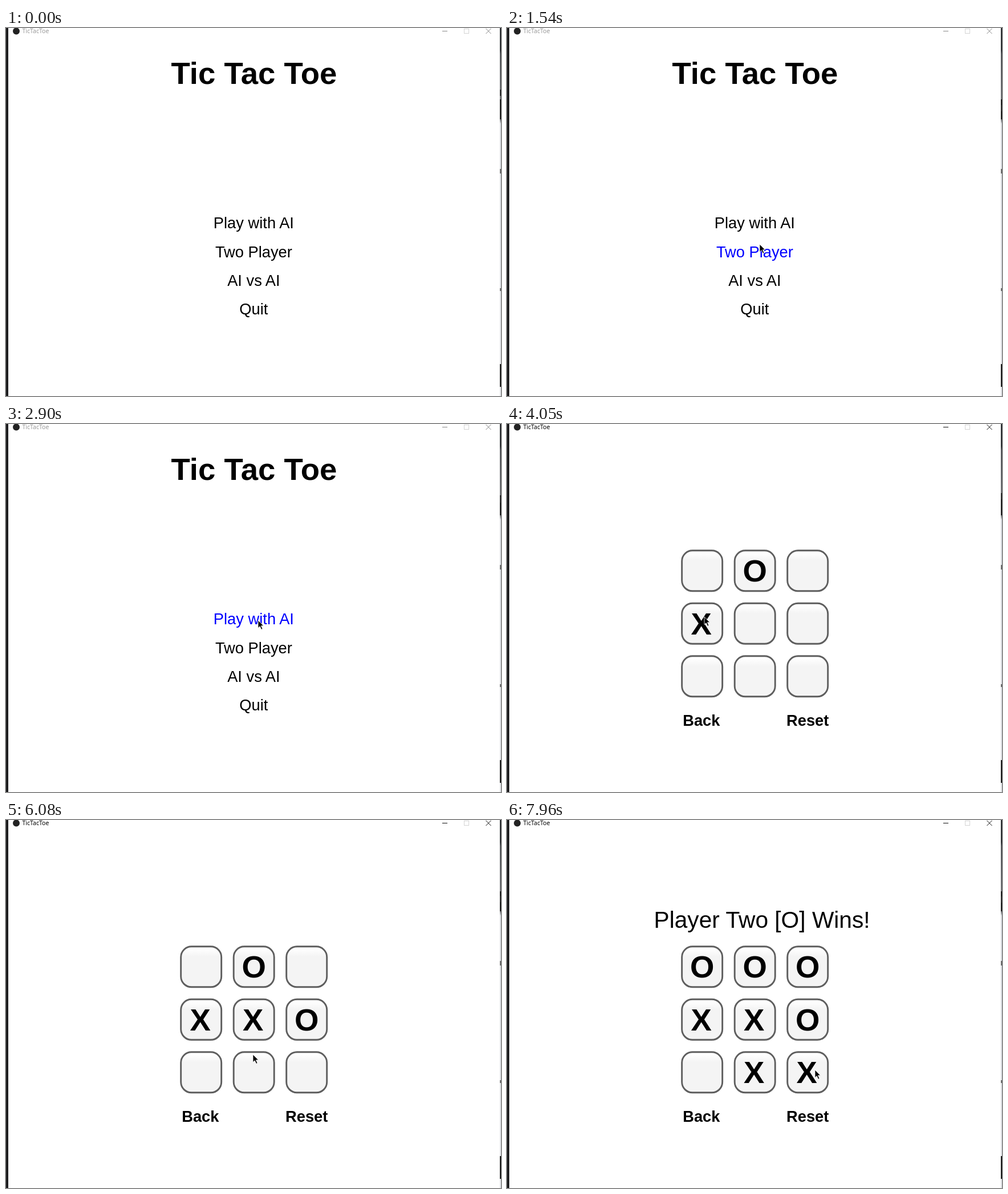
An HTML page that plays this animation: 868x645 px, repeating every 8000 ms.

```html
<!DOCTYPE html>
<html lang="en">
<head>
<meta charset="utf-8">
<title>TicTacToe</title>
<style>
  html, body { margin: 0; width: 100%; height: 100%; overflow: hidden; background: #fff; }
  svg { display: block; width: 868px; height: 645px; }
  text { font: 27.3px "Liberation Sans", Arial, sans-serif; }
  .bold { font-weight: bold; }
  .huge { font-size: 54.5px; }
  .result { font-size: 40.7px; }
  .caption { font: 10.5px "Noto Sans", sans-serif; }
  .centered { text-anchor: middle; }
</style>
</head>
<body>
<svg viewBox="0 0 868 645">
  <defs>
    <linearGradient id="face" x2="0" y2="1">
      <stop offset=".05" stop-color="#fff"/>
      <stop offset=".25" stop-color="#f4f4f4"/>
    </linearGradient>
    <linearGradient id="desk" x2="0" y2="1">
      <stop offset=".06" stop-color="#24262a"/>
      <stop offset=".07" stop-color="#4a4c50"/>
      <stop offset=".25" stop-color="#74767a"/>
      <stop offset=".26" stop-color="#d2d5da"/>
      <stop offset="1" stop-color="#dcdee2"/>
    </linearGradient>
  </defs>
  <rect width="868" height="645" fill="#fff"/>
  <rect width="4" height="645" fill="#1d1d1f"/>
  <rect x="866" width="2" height="645" fill="url(#desk)"/>
  <path d="M867 125v35M867 589v40" stroke="#151515" stroke-width="2"/>
  <path d="M867 247v8M867 456v5" stroke="#666" stroke-width="2"/>
  <rect id="flicker" x="866" width="2" height="11" fill="#222"/>

  <circle cx="18" cy="5.5" r="6" fill="#222"/>
  <text id="caption" class="caption" x="28.5" y="9">TicTacToe</text>
  <g id="controls" fill="none">
    <path d="M765 5.5h9M841.5 1l9 9m0-9l-9 9"/>
    <rect x="803.5" y="1.5" width="8" height="8" stroke="#d4d4d4"/>
  </g>

  <g id="menu">
    <text class="bold huge centered" x="434.9" y="98">Tic Tac Toe</text>
  </g>
  <g id="game">
    <text id="result" class="result" x="257.5" y="189">Player Two [O] Wins!</text>
    <text class="bold" x="308.2" y="529">Back</text>
    <text class="bold" x="490" y="529">Reset</text>
  </g>
  <path id="cursor" d="M0 0V13.5L3.2 10.7 5.8 16.3 8 15.3 5.5 9.8H9.7Z" stroke="#fff" stroke-width=".8"/>
</svg>
<script>
const LOOP = 8000, GAME_START = 3040;
const CENTER = 434.4, PITCH = 92.5;
const ITEMS = ["Play with AI", "Two Player", "AI vs AI", "Quit"];
const ORDER = [3, 1, 4, 5, 7, 2, 8, 0];   // cells, X and O in turn
const CLICKS = [3860, 5050, 6520, 7500];  // each places an X and the reply
const ENTRY = [700, 645];
// pointer glides: start, end, tip x, tip y
const GLIDES = [
  [30, 500, 540, 376], [500, 830, 479, 371], [870, 1400, 443, 379],
  [1680, 2250, 436, 486], [2250, 2850, 442, 344], [3330, 3800, 346, 338],
  [4120, 4700, 425, 338], [5540, 6400, 436, 444], [6640, 7450, 540, 438]
];

const $ = id => document.getElementById(id);
const show = (node, on) => node.setAttribute("visibility", on ? "inherit" : "hidden");

function add(parent, tag, attrs, text = "") {
  const node = document.createElementNS("http://www.w3.org/2000/svg", tag);
  for (const key in attrs) node.setAttribute(key, attrs[key]);
  node.textContent = text;
  return parent.appendChild(node);
}

const itemY = i => 351.2 + i * 50.3;
const labels = ITEMS.map((text, i) =>
  add($("menu"), "text", { class: "centered", x: CENTER, y: itemY(i) }, text));

const cellX = i => 342.2 + i % 3 * PITCH;
const cellY = i => 257.3 + Math.floor(i / 3) * PITCH;
for (let i = 0; i < 9; i++) {
  add($("game"), "rect", {
    x: cellX(i) - 35.5, y: cellY(i) - 35.5, width: 71, height: 71, rx: 18.5,
    fill: "url(#face)", stroke: "#5e5e5e", "stroke-width": 2.9
  });
}
const marks = ORDER.map((cell, turn) => {
  const isX = turn % 2 === 0;
  return add($("game"), "text", {
    class: "bold huge centered", x: cellX(cell) - (isX ? 1.5 : 0), y: cellY(cell) + 18.9
  }, isX ? "X" : "O");
});

const smooth = k => k * k * (3 - 2 * k);

function pointerAt(t) {
  let [x, y] = ENTRY;
  for (const [from, to, toX, toY] of GLIDES) {
    const k = smooth(Math.min(1, Math.max(0, (t - from) / (to - from))));
    x += (toX - x) * k;
    y += (toY - y) * k;
  }
  return [x, y];
}

function draw(t) {
  const [x, y] = pointerAt(t), playing = t >= GAME_START;
  show($("menu"), !playing);
  show($("game"), playing);
  show($("result"), t >= CLICKS[3]);
  marks.forEach((mark, turn) => show(mark, t >= CLICKS[turn >> 1]));
  labels.forEach((label, i) => {
    const hover = Math.abs(x - CENTER) < 73 && Math.abs(y - itemY(i) + 9.5) < 14;
    label.setAttribute("fill", hover ? "#00f" : "#000");
  });
  $("caption").setAttribute("fill", playing ? "#000" : "#999");
  $("controls").setAttribute("stroke", playing ? "#111" : "#888");
  $("cursor").setAttribute("transform", `translate(${Math.round(x)} ${Math.round(y)})`);
  $("flicker").setAttribute("y", 108 + Math.floor(t / 120) * 11 % 35);
}

const start = performance.now();
function tick(now) {
  draw(Math.max(0, now - start) % LOOP);
  requestAnimationFrame(tick);
}
draw(0);
requestAnimationFrame(tick);
</script>
</body>
</html>
```
